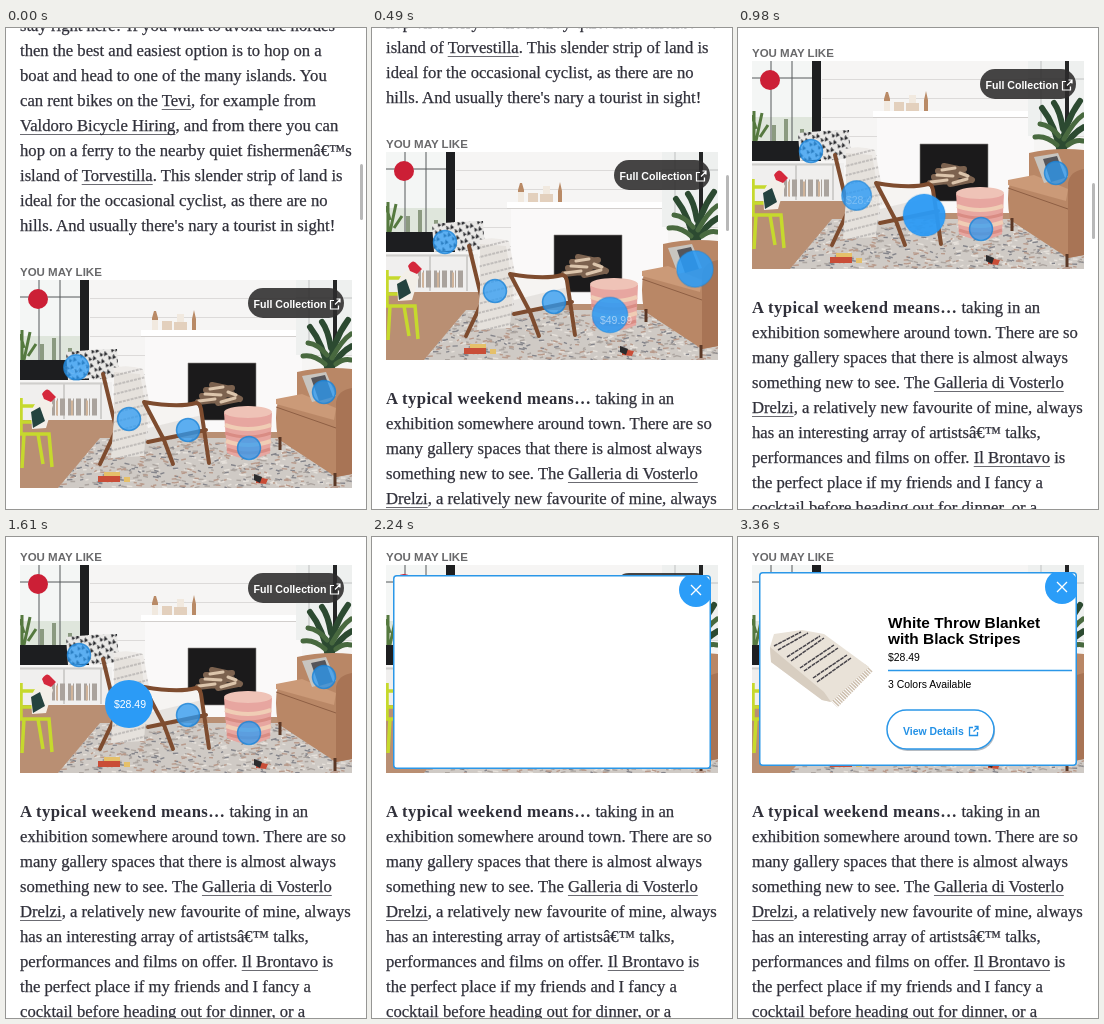
An HTML page that plays this animation: 360x481 px, repeating every 3660 ms.

```html
<!DOCTYPE html>
<html lang="en">
<head>
<meta charset="utf-8">
<style>
html, body { margin: 0; width: 100%; height: 100%; overflow: hidden; background: #fff; }
#stage { position: relative; width: 360px; height: 481px; overflow: hidden; font-family: "Liberation Sans", Arial, sans-serif; }
#page, #page > *, #card { position: absolute; }
#page { left: 14px; top: 0; }
p { margin: 0; white-space: pre; font: 16.67px/25px "Liberation Serif", serif; color: #30303a; -webkit-text-stroke: .25px #30303a; }
u { text-decoration-color: #6b6b72; text-underline-offset: 3px; text-decoration-thickness: 1px; text-decoration-skip-ink: none; }
p b { letter-spacing: .4px; -webkit-text-stroke: 0; }
h2 { margin: 0; top: -15px; font-size: 11.5px; line-height: 14px; color: #69696b; white-space: pre; }
#bar { position: absolute; left: 354px; width: 3px; height: 56px; border-radius: 2px; background: #b8b8b8; }
#card { left: 0; top: 0; }
</style>
</head>
<body>
<div id="stage">
<div id="page">
<p style="top:-267px">stay right here? If you want to avoid the hordes
then the best and easiest option is to hop on a
boat and head to one of the many islands. You
can rent bikes on the <u>Tevi</u>, for example from
<u>Valdoro Bicycle Hiring</u>, and from there you can
hop on a ferry to the nearby quiet fishermenâ€™s
island of <u>Torvestilla</u>. This slender strip of land is
ideal for the occasional cyclist, as there are no
hills. And usually there's nary a tourist in sight!</p>
<h2>YOU MAY LIKE</h2>
<svg id="photo" width="332" height="208" viewBox="14 0 332 208">
  <defs>
    <pattern id="planks" width="40" height="19" patternUnits="userSpaceOnUse"><path d="M0 18.5H40" stroke="#dcdad9"/></pattern>
    <pattern id="checks" width="9" height="8" patternUnits="userSpaceOnUse" patternTransform="rotate(20)"><path d="M0 1l4 2-3 3zM5 4l4 1-2 3z" fill="#26272b"/></pattern>
    <pattern id="knit" width="20" height="9" patternUnits="userSpaceOnUse" patternTransform="rotate(-14)"><path d="M0 2H20" stroke="#9c9999" stroke-dasharray="3 1"/></pattern>
    <clipPath id="carpet"><path d="M94 158H284L346 190v18H52z"/></clipPath>
  </defs>
  <path fill="#f6f5f4" d="M14 0h332v208H14z"/>
  <path fill="url(#planks)" d="M84 0h262v100H84z"/>
  <!-- left window, sill and shelf -->
  <path fill="#f4f6f5" d="M14 0h62v82H14z"/>
  <path fill="#dfe6dc" d="M14 56h60v24H14z"/>
  <path d="M33 0V82M54 0V82M14 17H76" stroke="#55585a"/>
  <path fill="#1d1e20" d="M74 0h9v100H14V80h60z"/>
  <path d="M16 80V50M18 80l6-28M18 68l-4-14M22 76l8-12" stroke="#55793f" stroke-width="3"/>
  <path d="M36 80V64M48 80V58M64 80V68" stroke="#8b9a80" stroke-width="4"/>
  <path fill="#f0efee" d="M14 102h92v38H14z"/>
  <path d="M14 103.500h88M58 103v36M95 103v36" stroke="#cfcecc" stroke-width="2"/>
  <path d="M46 127H94" stroke="#aaa39d" stroke-width="17" stroke-dasharray="3 2 1 2 5 3"/>
  <path d="M50 128H92" stroke="#d0b49a" stroke-width="15" stroke-dasharray="2 13"/>
  <path fill="#e9e8e6" d="M60 72l24-2 3 28-25 2zM82 70l29-1 2 28-26 3z"/>
  <path fill="url(#checks)" d="M60 72l24-2 3 28-25 2zM82 70l29-1 2 28-26 3z"/>
  <!-- floor and rug -->
  <path fill="#b98f73" d="M14 140H346v68H14z"/>
  <g clip-path="url(#carpet)">
    <path fill="#cfcac5" d="M14 150H346v58H14z"/>
    <g id="rug"></g>
  </g>
  <!-- fireplace -->
  <path fill="#faf9f9" d="M139 56H296v96H139z"/>
  <path fill="#fff" d="M135 50H300v6H135z"/>
  <path d="M135 56.500H300" stroke="#d2cfcd"/>
  <path fill="#1b1a1b" stroke="#8a8785" stroke-width=".6" d="M182 83h68v57h-68z"/>
  <path d="M192 122l26-3M196 116l30-2M212 123l20-4M200 110l26-2M206 105l14 3M226 115l8 4" stroke="#7c624f" stroke-width="6" stroke-linecap="round"/>
  <path d="M193 121l16-2M199 114l16 1M215 122l14-4M204 109l13-2M222 112l8 3" stroke="#dcc5ac" stroke-width="3" stroke-linecap="round"/>
  <path fill="#b98a66" d="M146 50V38l2-7h2l2 7v12zM186 50V39l2-9 2 9v11z"/>
  <path fill="#e3d0bd" d="M156 41h10v9h-10zM168 42h13v8h-13z"/>
  <path fill="#f1e9df" d="M146 40h6v10h-6zM171 34h7v8h-7z"/>
  <!-- right window and plant -->
  <path fill="#eef0ef" d="M290 0h56v75h-56z"/>
  <path d="M303 0V65M290 18H346" stroke="#bfc1c1"/>
  <path fill="#242526" d="M327 0h4v68h-4z"/>
  <g fill="none" stroke-linecap="round">
    <path d="M322 92Q318 65 304 47M323 90Q326 62 342 40M324 90Q334 72 346 66M325 68Q322 50 316 42" stroke="#2c4a31" stroke-width="6"/>
    <path d="M321 75Q312 64 302 63M326 78Q336 60 345 54M319 84Q308 74 297 76M330 84Q338 78 345 80" stroke="#48693f" stroke-width="5"/>
  </g>
  <!-- sofa -->
  <path fill="#b98766" d="M291 92q26-6 55-3v105l-16 3-58-38q-4-24 0-38l19-3z"/>
  <path fill="#cb9a78" d="M270 119l26-5 34 14-2 12-58-16z"/>
  <path fill="#a87455" d="M330 122q2-12 16-14v86l-16 3z"/>
  <path d="M270 127l60 21" stroke="#8e5f44"/>
  <path d="M274 157v13M329 193v13" stroke="#5b3826" stroke-width="3"/>
  <path fill="#c8c5c0" d="M296 96l24-4 10 24-24 6z"/>
  <path fill="#55555a" d="M305 98l14-3 8 22-14 4z"/>
  <!-- armchair and throw -->
  <path d="M97 94l14 58M94 184l17-36M158 160l9 24" fill="none" stroke="#7e4c2f" stroke-width="4" stroke-linecap="round"/>
  <path fill="#e6e3e0" d="M134 128l58-2 8 24-52 12-16-6z"/>
  <path fill="#f6f4f2" d="M136 127l55-3 5 11-54 13z"/>
  <path fill="#eeebe8" d="M107 88q14-4 30 1l10 54-30 12z"/>
  <path fill="#e5e1dc" d="M108 92l26 2 7 42-3 40-33 2 3-42z"/>
  <path fill="url(#knit)" d="M107 88q14-4 30 1l8 44-7 43-33 2 3-42z"/>
  <path d="M138 122q34 6 52 1q4 0 5 6l8 54M142 162l58-12M138 122l20 38" fill="none" stroke="#7e4c2f" stroke-width="4" stroke-linecap="round" stroke-linejoin="round"/>
  <!-- pouf -->
  <path fill="#e7a6a0" d="M218 133q24-13 48 0l-2 40q-21 11-43 0z"/>
  <path d="M219 145q23 8 46 0M220 161q22 8 45 0" fill="none" stroke="#f0cdb5" stroke-width="4"/>
  <path d="M219 153q23 8 46 0M221 169q22 8 43 0" fill="none" stroke="#d98c84" stroke-width="3"/>
  <ellipse cx="242" cy="132" rx="24" ry="6" fill="#efc3b7"/>
  <!-- small chair and toys -->
  <path d="M15 118v36h28l3 33M18 154l-2 34M32 154l5 30M15 126h14M15 142h14" fill="none" stroke="#c6d92d" stroke-width="3.500"/>
  <path fill="#f3efe8" d="M26 149l-1-18q8-16 17-14l5 8-7 23z"/>
  <path fill="#24433f" d="M25 132l9-5 5 14-12 7z"/>
  <path fill="#d5283c" d="M36 114q5-8 9-2l5 5-5 5-7-3z"/>
  <path fill="#c94d37" d="M92 196h22v6H92zM250 197l12 2-2 5-10-1z"/>
  <path fill="#e5c06a" d="M98 192h16v4H98zM118 197h6v5h-6z"/>
  <path fill="#2b2b2d" d="M248 194l8 3-2 6-6-3z"/>
  <circle cx="32" cy="19" r="10" fill="#cc1f36"/>
  <rect x="242" y="8" width="96" height="30" rx="15" fill="#2d2c2c" fill-opacity=".88"/>
  <text x="247.500" y="28" font-size="10.600" font-weight="700" fill="#fff">Full Collection</text>
  <path d="M328 20.500h-3.500v8.500h8v-3.500M329 24.500l5-5M330.500 19h3.500v3.500" fill="none" stroke="#fff" stroke-width="1.200"/>
  <g id="spots" text-anchor="middle" font-size="10.500"></g>
</svg>
<p style="top:234px"><b>A typical weekend means…</b> taking in an
exhibition somewhere around town. There are so
many gallery spaces that there is almost always
something new to see. The <u>Galleria di Vosterlo</u>
<u>Drelzi</u>, a relatively new favourite of mine, always
has an interesting array of artistsâ€™ talks,
performances and films on offer. <u>Il Brontavo</u> is
the perfect place if my friends and I fancy a
cocktail before heading out for dinner, or a</p>
</div>
<div id="bar"></div>
<svg id="card" width="360" height="481">
  <clipPath id="edge"><rect x="21" y="35" width="318" height="194" rx="3"/></clipPath>
  <rect id="panel" stroke="#2b97e8" stroke-width="1.500"/>
  <g id="close" clip-path="url(#edge)">
    <circle cx="324" cy="50" r="17" fill="#2b9df8"/>
    <path d="M319 45l10 10M329 45l-10 10" stroke="#fff" stroke-width="1.300"/>
  </g>
  <g id="blanket">
    <path d="M131 131L96 167" stroke="#cdbfae" stroke-width="10" stroke-dasharray="1.500 1"/>
    <path fill="#e9e2d8" d="M32 110l4-13 28-4 22 4 45 33-38 35-9-2-51-38z"/>
    <path fill="#d8cec1" d="M32 110l54 45 7 10-9-2-51-38z"/>
    <path d="M36 109l27-14M40 113l30-17M49 120l33-21M53 124l33-23M62 131l34-23M66 134l34-23M75 141l34-23M79 145l34-24" stroke="#47444a" stroke-width="1.500" stroke-dasharray="4 .7"/>
  </g>
  <g id="details" font-size="10.450">
    <g font-size="15.400" font-weight="700"><text x="150" y="91">White Throw Blanket</text><text x="150" y="107">with Black Stripes</text></g>
    <text x="150" y="123.500">$28.49</text>
    <path d="M150 133.500H334" stroke="#2b97e8" stroke-width="1.500"/>
    <text x="150" y="151">3 Colors Available</text>
    <rect x="150" y="175" width="107" height="39" rx="19.500" fill="#b5bbc2"/>
    <rect x="149" y="173" width="107" height="39" rx="19.500" fill="#fff" stroke="#2b97e8" stroke-width="1.500"/>
    <text x="165" y="197.500" font-weight="700" fill="#2391e6">View Details</text>
    <path d="M235 190.500h-3.500v8h8V195M235.500 194.500l4.500-4.500M236.500 189.500h3.500v3.500" fill="none" stroke="#2391e6" stroke-width="1.300"/>
  </g>
</svg>
</div>
<script>
const LOOP = 3660, STEP = 70, SELECTED = 1, OPEN = 1690;
const $ = id => document.getElementById(id);
const ramp = (t, a, b) => Math.min(1, Math.max(0, (t - a) / (b - a)));
const mix = (a, b, k) => a + (b - a) * k;
const set = (el, attrs) => { for (const key in attrs) el.setAttribute(key, attrs[key]); };
const add = (parent, tag) => parent.appendChild(document.createElementNS('http://www.w3.org/2000/svg', tag));

// Woven flecks of the rug, one path per tone
let seed = 7;
const random = () => (seed = seed * 16807 % 2147483647) / 2147483647;
for (const tone of ['#e6e1db', '#85858b', '#aca5a0', '#b89a8b']) {
  let d = '';
  for (let i = 0; i < 190; i++) {
    d += `M${mix(50, 346, random())} ${mix(158, 208, random())}l${mix(2, 6, random())} ${mix(-1.5, 1.5, random())}`;
  }
  set(add($('rug'), 'path'), { d, stroke: tone, 'stroke-width': 1.4 });
}

// x, y, time of the widest pulse, price
const spots = [
  [73, 90, 180, '$34.99'], [123, 139, 1125, '$28.49'], [182, 150, 910, '$89.99'],
  [243, 168, 600, '$49.99'], [318, 112, 385, '$18.99']
].map(([x, y, peak, price]) => {
  const [dot, label] = ['circle', 'text'].map(tag => add($('spots'), tag));
  set(dot, { fill: '#2b9bf6', stroke: '#1d83d6', 'stroke-width': 1.5 });
  set(label, { x: x + 1, y: y + 4, fill: '#fff' });
  label.textContent = price;
  return { x, y, peak, dot, label };
});

function drawSpot({ x, y, peak, dot, label }, i, t) {
  let phase = Math.max(-1, Math.min(1, (t - peak) / 220));
  if (i === SELECTED) phase = Math.min(0, phase);
  const grow = (1 + Math.cos(Math.PI * phase)) / 2;
  const drift = 5 * Math.sin(Math.PI * phase);
  set(dot, {
    cx: x + drift, cy: y + drift, r: 11.5 + 12.5 * grow,
    'fill-opacity': .74 + .26 * grow, 'stroke-opacity': .8 * (1 - grow)
  });
  set(label, { opacity: phase < 0 ? grow : Math.max(0, 1 - 5 * phase) });
}

function drawCard(t) {
  const k = 1 - (1 - ramp(t, OPEN, 2170)) ** 3;
  const white = ramp(t, 1800, 2100);
  $('card').style.display = t < OPEN ? 'none' : '';
  $('card').style.top = 3 * (1 - ramp(t, 2240, 2450)) * k + 'px';
  set($('panel'), {
    x: mix(99, 21.75, k), y: mix(143, 35.75, k),
    width: mix(48, 316.5, k), height: mix(48, 192.5, k), rx: mix(24, 3, k),
    fill: `rgb(${mix(43, 255, white)},${mix(157, 255, white)},${mix(248, 255, white)})`
  });
  set($('close'), { opacity: ramp(t, 2030, 2200) });
  set($('details'), { opacity: ramp(t, 2310, 2660) });
  set($('blanket'), { opacity: ramp(t, 2450, 2800) });
}

function draw(now) {
  const t = Math.floor(now % LOOP / STEP) * STEP;
  const y = t < 670 ? 252 - .2612 * t : 28 + 49 * (1 - ramp(t, 670, 1250)) ** 3;
  $('page').style.top = Math.round(y) + 'px';
  $('bar').style.top = 136 + (252 - y) * .087 + 'px';
  $('bar').style.opacity = 1 - ramp(t, 1200, 1500);
  spots.forEach((spot, i) => drawSpot(spot, i, t));
  drawCard(t);
}

let start;
function tick(now) {
  start ??= now;
  draw(now - start);
  requestAnimationFrame(tick);
}
requestAnimationFrame(tick);
</script>
</body>
</html>
```
